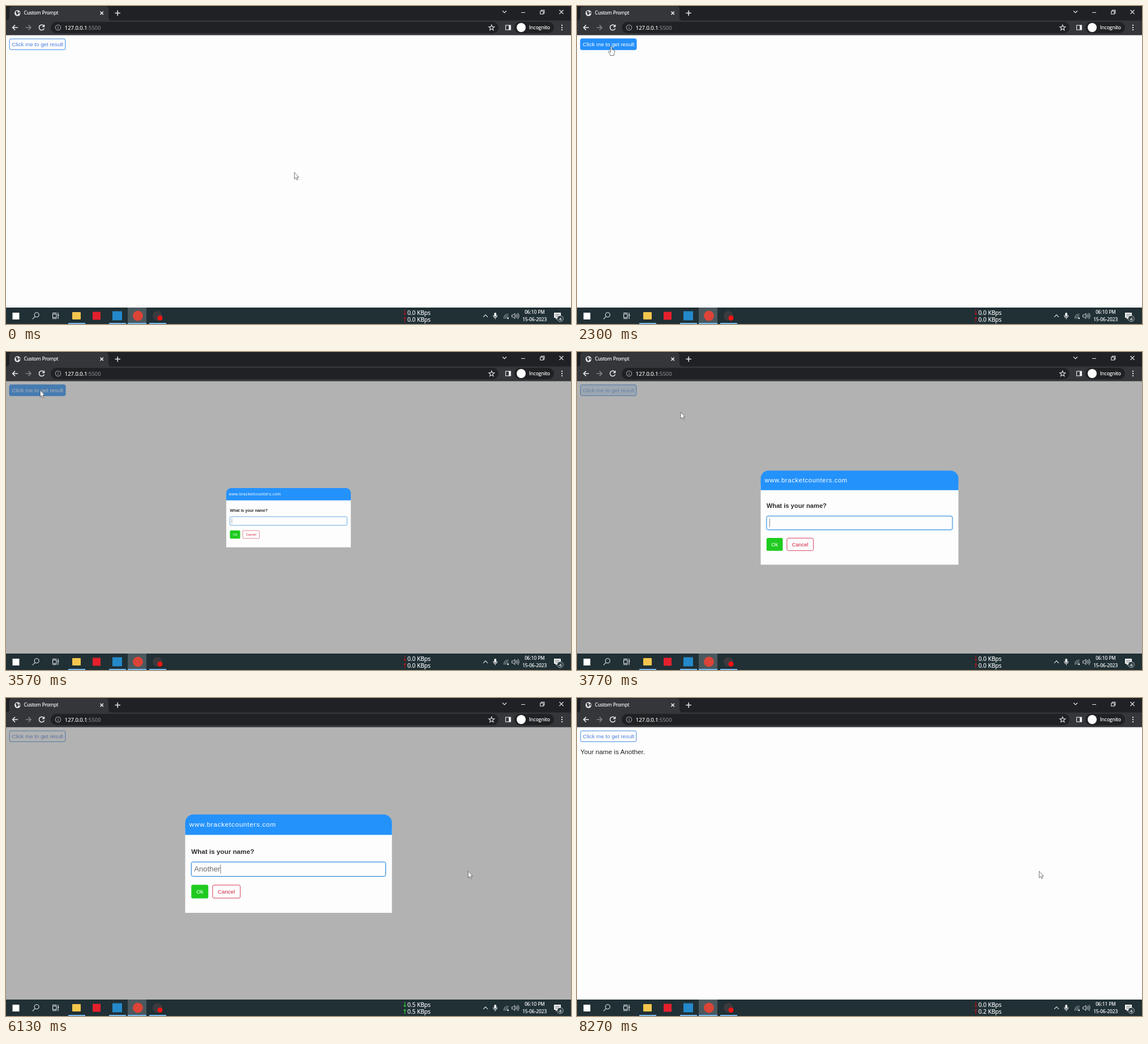
Recreate the animation shown at these times as an HTML page. Size 998 by 561 pixels, loop 8410 ms.

```html
<!DOCTYPE html>
<html lang="en">
<head>
<meta charset="utf-8">
<title>Custom Prompt</title>
<style>
  html, body { margin: 0; width: 100%; height: 100%; overflow: hidden; background: #fdfdfd; }
  svg { display: block; }
  text { white-space: pre; }
  .ui { font-family: "Open Sans", "Noto Sans", sans-serif; fill: #fff; }
  .ui text { stroke: #fff; stroke-width: .2; }
  .ui .port { fill: #9aa0a6; stroke: none; }
  .page { font-family: "Liberation Sans", Arial, sans-serif; font-size: 9.74px; }
  .line { fill: none; stroke: #e8eaed; stroke-width: 1.1; }
  .bold { stroke-width: 1.5; }
</style>
</head>
<body>
<svg width="998" height="561" viewBox="0 0 998 561">
  <rect width="998" height="561" fill="#fdfdfd"/>

  <!-- Page -->
  <g class="page">
    <rect x="6.2" y="58" width="98.6" height="19" rx="2.5" fill="#fdfdfd" stroke="#3b86e2"/>
    <rect id="hover" x="5.7" y="57.5" width="99.6" height="20" rx="3" fill="#2490fb"/>
    <text id="label" x="10.3" y="71">Click me to get result</text>
    <text id="result" x="6" y="99.3" font-size="11.69" fill="#222"></text>
  </g>
  <rect id="shade" y="51" width="998" height="482" fill="#686868" opacity=".5"/>

  <!-- Dialog -->
  <g id="dialog" class="page">
    <rect x="316.5" y="230" width="365.2" height="149" fill="#fdfdfd"/>
    <path d="M316.5 241.5V220a14.6 14.6 0 0 1 14.6-14.6H667.1a14.6 14.6 0 0 1 14.6 14.6V241.5Z" fill="#2492fb"/>
    <text x="323.8" y="227" font-size="11.69" letter-spacing=".73" fill="#fff">www.bracketcounters.com</text>
    <text x="327.3" y="274.5" font-size="11.69" font-weight="bold" fill="#2c2c2c">What is your name?</text>
    <rect x="327.5" y="289.5" width="343" height="25" rx="3" fill="none" stroke="#58a9f4" stroke-width="3" opacity=".35"/>
    <rect x="327.5" y="289.5" width="343" height="25" rx="3" fill="#fdfdfd" stroke="#3a8edb"/>
    <text id="typed" x="332.3" y="306.3" font-size="13.15" fill="#6b6b6b"></text>
    <rect id="caret" y="294" width="1" height="15.5" fill="#777"/>
    <rect x="327.3" y="329.5" width="30" height="24" rx="2.8" fill="#1fcb20"/>
    <text x="336.2" y="345" fill="#fff">Ok</text>
    <rect x="365" y="330" width="48.8" height="23" rx="2.8" fill="none" stroke="#d63c56"/>
    <text x="374" y="345" fill="#d3213f">Cancel</text>
  </g>

  <!-- Browser bar -->
  <g class="ui">
    <rect width="998" height="26" fill="#202124"/>
    <path d="M0 25.5Q6 25.5 6 19.5V6Q6 .5 11.5 .5H175.5Q181 .5 181 6V19.5Q181 25.5 187 25.5H998V51.5H0Z" fill="#35363a"/>
    <rect x="79" y="28" width="791" height="20" rx="10" fill="#202124"/>
    <rect x="898" y="28" width="70" height="20" rx="10" fill="#202124"/>
    <circle cx="20.3" cy="12.5" r="5.2" fill="#e8eaed"/>
    <path d="M17 10q2-2 4-1l-1 2 2 1-1 3-2 1-1-3zM22.5 10l2 1v3l-2-1z" fill="#35363a"/>
    <text x="31.7" y="15.3" font-size="8.27">Custom Prompt</text>
    <path class="line bold" d="M166.5 9.7l5.4 5.4m0-5.4l-5.4 5.4M192.5 12.5h9.4M197.2 7.8v9.4
      M21 38H11.8M16 33.6L11.6 38l4.4 4.4M67 35.3A4.7 4.7 0 1 0 67.5 39.5M67.5 33v3.5H64"/>
    <path class="line bold" d="M34.7 38h9.2M39.7 33.6l4.4 4.4-4.4 4.4" style="stroke:#808286"/>
    <path class="line" d="M877 8.5l3.5 3.5 3.5-3.5M910 11.5h7M943.8 9h5.2v5.2h-5.2zM945.5 9V7.3h5.3v5.3H949M977.5 7l7 7m0-7l-7 7"/>
    <circle class="line" cx="92" cy="38" r="4.7" style="stroke:#9aa0a6"/>
    <path class="line" d="M92 37.3v3.5M92 35v1.2" style="stroke:#9aa0a6"/>
    <text x="103.8" y="41.5" font-size="9.42">127.0.0.1<tspan class="port">:5500</tspan></text>
    <path class="line" d="M857.7 33.2l1.3 3.4 3.7.2-2.9 2.3 1 3.5-3.1-2-3.1 2 1-3.5-2.9-2.3 3.7-.2z"/>
    <rect class="line" x="882.5" y="34" width="9" height="8"/>
    <rect x="888" y="34" width="4" height="8" fill="#e8eaed"/>
    <circle cx="910" cy="38" r="8" fill="#fff"/>
    <text x="924" y="41.2" font-size="8.5">Incognito</text>
    <path d="M982 33v2m0 2v2m0 2v2" stroke="#e8eaed" stroke-width="2"/>
  </g>

  <!-- Taskbar -->
  <g class="ui">
    <rect y="532" width="998" height="29" fill="#203035"/>
    <rect x="215" y="532" width="33" height="29" fill="#4a595e"/>
    <path d="M110 560h30m42 0h30m3 0h33m5 0h30" stroke="#76b9ed" stroke-width="2"/>
    <rect x="11.5" y="541" width="12" height="12" fill="#fff"/>
    <circle class="line" cx="54.2" cy="544.7" r="4"/>
    <path class="line" d="M51.3 547.8l-4.5 4.5M82.5 543.5h6.5v6h-6.5zM82 541.5h7.5M82 551.5h7.5M92 541v11M91 545.5h3"/>
    <rect x="117" y="540" width="15" height="13" rx="1" fill="#f4c64e"/>
    <rect x="153" y="539.5" width="14" height="14" fill="#e5202d"/>
    <rect x="188" y="538.5" width="17" height="16" fill="#2489ca"/>
    <circle cx="233" cy="546.5" r="9" fill="#db4437"/>
    <circle cx="267.5" cy="546.5" r="8.5" fill="#3b3a3e"/>
    <circle cx="272" cy="550.5" r="4.5" fill="#f01414"/>
    <path id="down" class="line" d="M704.5 536v8.5m-2-2.3l2 2.5 2-2.5"/>
    <path id="up" class="line" d="M704.5 558v-8.5m-2 2.3l2-2.5 2 2.5"/>
    <text id="downRate" x="709" y="544.5" font-size="10.2"></text>
    <text id="upRate" x="709" y="557.3" font-size="10.2"></text>
    <path class="line" d="M843 548.8l4-4 4 4"/>
    <rect x="862.3" y="541" width="3.8" height="7" rx="1.9" fill="#fff"/>
    <path class="line" d="M860.8 545.5q0 4 3.4 4t3.4-4M864.2 549.5v3"/>
    <path class="line" d="M879.5 551.5q0-8 8-8M882 551.5q0-5.5 5.5-5.5M884.5 551.5q0-3 3-3" style="stroke:#9ba4a7"/>
    <circle cx="886.8" cy="551" r="1.2" fill="#fff"/>
    <path class="line" d="M893.5 545h2.3l3-2.8v9.3l-3-2.8h-2.3zM900.5 544.5q1.7 2.2 0 4.5M902.3 543q2.8 3.8 0 7.5M904.2 541.5q3.7 5.2 0 10.5" style="stroke-width:.9"/>
    <g text-anchor="middle" font-size="8.27">
      <text id="clock" x="934" y="542.7"></text>
      <text x="933.7" y="556">15-06-2023</text>
    </g>
    <path d="M968 541h12v9h-6l-3 3v-3h-3z" fill="#f4f4f4"/>
    <path d="M970 544h8m-8 3h8" stroke="#5a666a"/>
    <circle cx="979" cy="551.5" r="5.3" fill="#2b3a3f" stroke="#cfd4d6" stroke-width=".8"/>
    <text x="979" y="554.5" font-size="8" text-anchor="middle">4</text>
  </g>

  <!-- Pointer -->
  <g id="pointer" fill="#fff" stroke="#505050" stroke-width=".8" stroke-linejoin="round">
    <path id="arrow" d="M.4 .6V12.2L3 9.7 4.9 13.8 6.7 13 4.9 9H8.3Z"/>
    <path id="hand" d="M-1.2 1.2Q0-.8 1.2 1.2V6.2L2.8 6.3 4.6 6.9 6 7.8V11.5L4.7 14V16.3H-2V14.5L-5 10.5Q-5.3 8.5-3.3 9L-1.2 11Z"/>
  </g>
</svg>
<script>
const LOOP = 8410, OPEN = 3570, CLOSE = 6270;
const NAME = "Another", TYPE_START = 4750, KEY_GAP = 190;
// Pointer stops: time, x, y
const stops = [[30, 509, 293], [880, 62, 68], [1130, 62, 68], [1330, 70, 78], [1700, 61, 72],
  [2270, 60.5, 71], [3000, 60.5, 71], [3400, 60, 67], [3600, 60, 67], [4270, 816, 305]];
// Network rates: time, download, upload
const rates = [[0, 0, 0], [4000, 5.5, 4], [5000, .5, .5], [7000, 0, 0], [8000, 0, .2]];

const $ = id => document.getElementById(id);
const set = (id, name, value) => $(id).setAttribute(name, value);
const show = (id, on) => set(id, "visibility", on ? "visible" : "hidden");
const write = (id, text) => { $(id).textContent = text; };
const clamp = (v, lo = 0, hi = 1) => Math.min(hi, Math.max(lo, v));
const smooth = p => p * p * (3 - 2 * p);
const mix = (a, b, p) => a + (b - a) * p;

function pointerAt(t) {
  if (t >= stops.at(-1)[0]) return stops.at(-1).slice(1);
  const i = Math.max(1, stops.findIndex(s => s[0] > t));
  const [from, to] = [stops[i - 1], stops[i]];
  const p = smooth(clamp((t - from[0]) / (to[0] - from[0])));
  return [mix(from[1], to[1], p), mix(from[2], to[2], p)];
}

function drawPointer(t, open) {
  const [x, y] = pointerAt(t);
  const onButton = !open && x > 6 && x < 105 && y > 57 && y < 77;
  set("pointer", "transform", `translate(${x} ${y})`);
  show("arrow", !onButton);
  show("hand", onButton);
}

function drawButton(t) {
  const fill = clamp((t - 850) / 250) * (1 - clamp((t - OPEN) / 250));
  set("hover", "opacity", fill);
  set("label", "fill", `rgb(${[79, 127, 224].map(c => Math.round(mix(c, 255, fill)))})`);
}

function drawDialog(t, open) {
  show("shade", open);
  show("dialog", open);
  const grow = 1 - (1 - clamp((t - OPEN) / 300)) ** 2;
  set("dialog", "transform", `translate(499 292.3) scale(${mix(.6, 1, grow)}) translate(-499 -292.3)`);
  const count = clamp(Math.floor((t - TYPE_START) / KEY_GAP) + 1, 0, NAME.length);
  write("typed", NAME.slice(0, count));
  const lastKey = count ? TYPE_START + KEY_GAP * (count - 1) : 3630;
  set("caret", "x", 332.5 + (count ? $("typed").getComputedTextLength() : 0));
  show("caret", open && (t - lastKey) % 1000 < 500);
}

function drawTray(t) {
  const [, down, up] = rates.findLast(r => r[0] <= t);
  for (const [id, rate] of [["down", down], ["up", up]]) {
    write(id + "Rate", rate.toFixed(1) + " KBps");
    $(id).style.stroke = rate < .5 ? "#b5141b" : "#35d03a";
  }
  write("clock", t < 7700 ? "06:10 PM" : "06:11 PM");
}

function frame(now) {
  const t = now % LOOP, open = t >= OPEN && t < CLOSE;
  drawPointer(t, open);
  drawButton(t);
  drawDialog(t, open);
  drawTray(t);
  write("result", t >= CLOSE ? `Your name is ${NAME}.` : "");
  requestAnimationFrame(frame);
}
requestAnimationFrame(frame);
</script>
</body>
</html>
```
